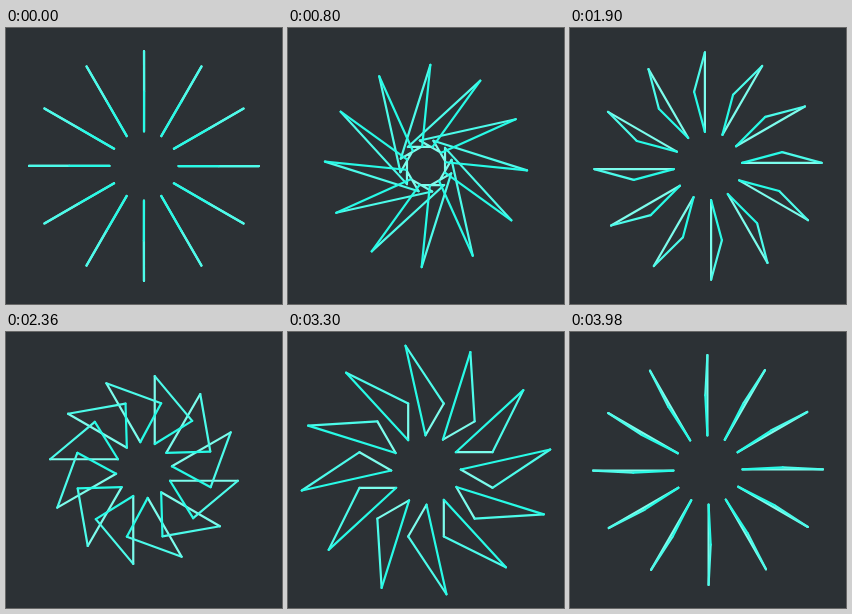
An HTML page for the animation above (4 s loop, 276 by 276 pixels).

```html
<!DOCTYPE html>
<html lang="en">
<head>
<meta charset="utf-8">
<title>Triangle burst</title>
<style>
  html, body { margin: 0; width: 100%; height: 100%; overflow: hidden; background: #2c3135; }
  svg { display: block; width: 100vw; height: 100vh; }
  path { fill: none; stroke-width: 2.2; stroke-linecap: round; }
  #base { stroke: #7cfcec; }
  #outer { stroke: #4cfbea; }
  #inner { stroke: #28fae6; }
</style>
</head>
<body>
<svg viewBox="0 0 276 276">
  <path id="base"/>
  <path id="outer"/>
  <path id="inner"/>
</svg>
<script>
const PERIOD = 4000;
const SPOKES = 12;
const CENTER = 138;

// Equilateral triangles: the base lies along a spoke, the tip beside it.
const SIDE = 80.5;
const MIDDLE = 74.75;
const OFFSET = 20;
const near = { depth: OFFSET, reach: MIDDLE - SIDE / 2 };
const far = { depth: OFFSET, reach: MIDDLE + SIDE / 2 };
const tip = { depth: OFFSET + SIDE * Math.sqrt(3) / 2, reach: MIDDLE };
const edges = { base: [near, far], outer: [far, tip], inner: [tip, near] };

// Tumbles a corner by the turn, then places it on its spoke.
function project({ depth, reach }, turn, spoke) {
  const s = Math.sin(turn);
  const x = depth * s;
  const y = reach * Math.cos(turn) - depth * s ** 3;
  const sin = Math.sin(spoke), cos = Math.cos(spoke);
  return (CENTER + x * cos + y * sin).toFixed(2) + ' ' + (CENTER + x * sin - y * cos).toFixed(2);
}

function draw(time) {
  const turn = time / PERIOD * 2 * Math.PI;
  for (const [id, corners] of Object.entries(edges)) {
    let path = '';
    for (let i = 0; i < SPOKES; i++) {
      const spoke = i / SPOKES * 2 * Math.PI;
      path += 'M' + corners.map(corner => project(corner, turn, spoke)).join('L');
    }
    document.getElementById(id).setAttribute('d', path);
  }
}

const start = performance.now();
function tick() {
  draw((performance.now() - start) % PERIOD);
  requestAnimationFrame(tick);
}
tick();
</script>
</body>
</html>
```
